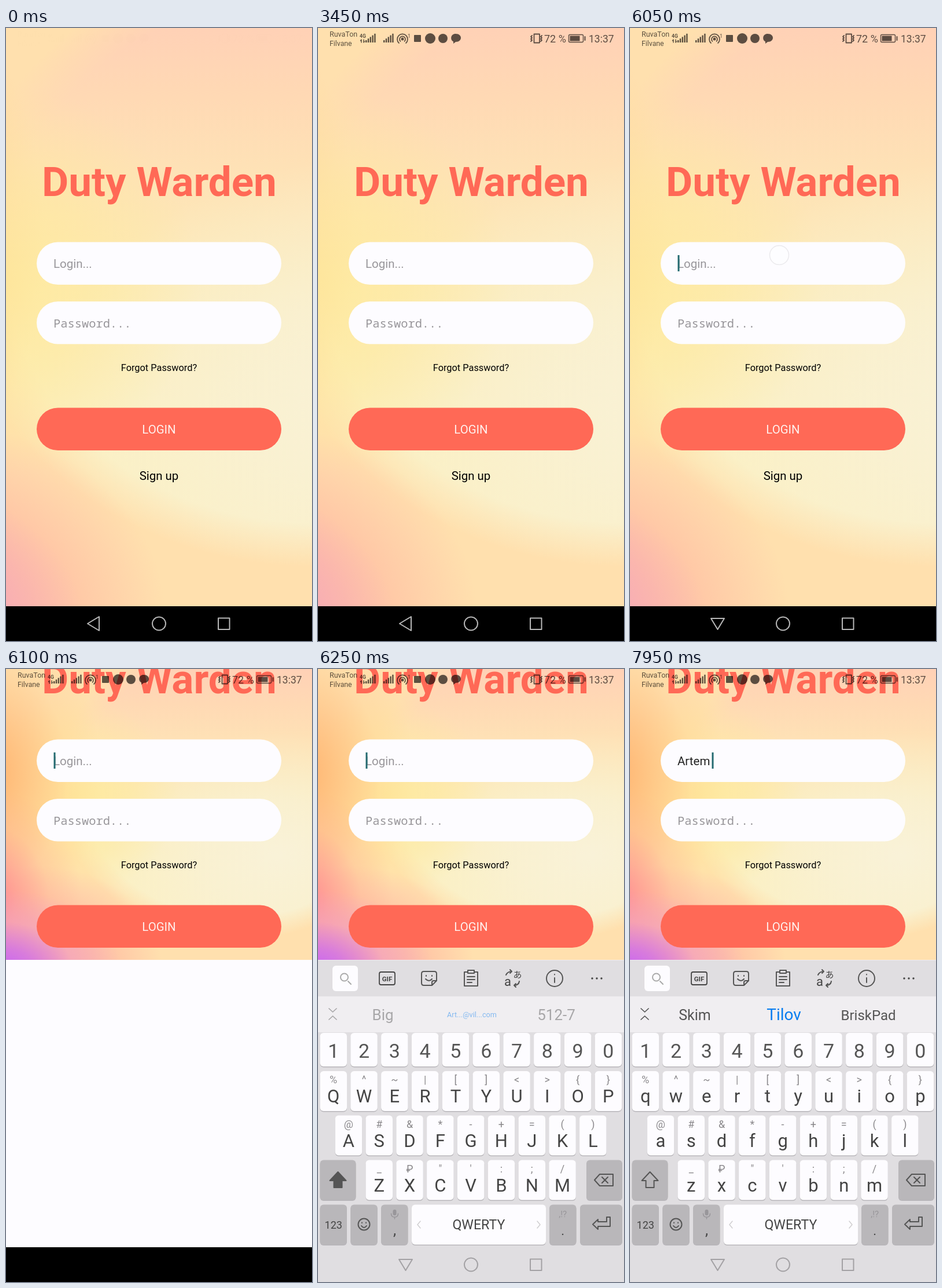
These frames come from a looping animation (529 by 1058 pixels, 8 s). An HTML page:

```html
<!DOCTYPE html>
<html lang="en">
<head>
<meta charset="utf-8">
<style>
html, body { margin: 0; width: 100%; height: 100%; overflow: hidden; background: #fdfcff; }
#clip { position: absolute; left: 0; top: 0; width: 529px; height: 998px; overflow: hidden; }
#sky {
  position: absolute; left: 0; top: 0; width: 529px; height: 502px;
  background:
    radial-gradient(ellipse 210px 140px at -10px 520px, #c662f4 0, #d274e6dd 28%, #eda0d077 60%, transparent),
    radial-gradient(ellipse 160px 190px at -30px 395px, #ff8690 0, #ff9590bb 30%, #ffa89044 65%, transparent),
    radial-gradient(ellipse 210px 170px at 60px 510px, #ffa8a0 0, #ffb4a0cc 45%, transparent),
    radial-gradient(ellipse 190px 270px at -25px 180px, #ffb470 0, #ffbc7c99 40%, #ffc88833 70%, transparent),
    radial-gradient(ellipse 180px 170px at 120px 220px, #ffe994bb 0, #ffe99877 50%, transparent),
    radial-gradient(ellipse 300px 255px at 400px 200px, transparent 90%, #ffe0ae 105%),
    radial-gradient(ellipse 300px 210px at 470px 320px, #f9f2d8 0, #f9f1d4cc 45%, transparent),
    linear-gradient(#ffd1b6, #ffd9b4 12%, #fee2b6 25%, #fcebb9 45%, #fbf0c2 70%, #fbf0c8);
}
svg { position: absolute; left: 0; top: 0; }
text { font-family: Roboto, sans-serif; }
.mid { text-anchor: middle; }
.line { fill: none; stroke: #555; stroke-width: 2; stroke-linejoin: round; stroke-linecap: round; }
</style>
</head>
<body>
<div id="clip"><div id="sky"></div></div>
<svg id="stage" width="529" height="1058" viewBox="0 0 529 1058"></svg>
<script>
const LOOP = 8000;
const $ = id => document.getElementById(id);
const clamp = v => Math.max(0, Math.min(1, v));
const text = (x, y, size, str, more = '') => `<text x="${x}" y="${y}" font-size="${size}" ${more}>${str}</text>`;
const mid = (x, y, size, str, fill, more = '') => text(x, y, size, str, `class="mid" fill="${fill}" ${more}`);
const box = (x, y, w, h, r, fill, more = '') =>
  `<rect x="${x}" y="${y}" width="${w}" height="${h}" rx="${r}" fill="${fill}" ${more}/>`;
const line = (d, more = '') => `<path class="line" d="${d}" ${more}/>`;

function form() {
  const pill = (y, fill) => box(53, y, 423, 73.5, 36.75, fill);
  return mid(265, 290, 71, 'Duty Warden', '#ff6956', 'font-weight="700"') +
    pill(369.5, '#fdfcff') + pill(472, '#fdfcff') +
    text(82, 414, 20.5, '', 'id="login"') +
    box(82.5, 392, 3, 28, 0, '#246a70', 'id="caret"') +
    text(82, 517, 20.4, 'Password...', 'fill="#98969a" style="font-family:Noto Sans Mono,monospace"') +
    mid(264.5, 592, 16.35, 'Forgot Password?', '#000') +
    pill(655.5, '#ff6956') +
    mid(264.5, 700, 20.4, 'LOGIN', '#fff1ee') +
    mid(264.5, 780, 20.4, 'Sign up', '#000');
}

function statusBar() {
  const bars = x => [0, 1, 2, 3, 4].map(i => box(x + i * 3.8, 21 - i * 2.8, 2.4, 4 + i * 2.8, 0, '#000')).join('');
  return text(20, 14.5, 12.5, 'RuvaTon') + text(20, 31, 12.3, 'Filvane') +
    text(72, 17, 8.5, '4G', 'font-weight="700"') +
    line('M75 25V20l-1.5 2M79 20v5l1.5-2', 'style="stroke:#000;stroke-width:1.4"') +
    bars(82) + bars(113) +
    '<circle cx="146" cy="19" r="2.5"/>' +
    line('M142.5 23a5 5 0 1 1 7 0M140 26a9 9 0 1 1 12 0', 'style="stroke:#000;stroke-width:1.7"') +
    text(155, 17, 9, '1') + box(166, 12, 12, 12, 1, '#000') +
    '<circle cx="194" cy="18" r="9"/><circle cx="216" cy="18" r="8"/>' +
    '<path d="M238 10c12 0 12 14 0 14l-4 3v-3.5c-6-3-5-13.5 4-13.5"/>' +
    line('M373.5 10.5h9.5v15h-9.5zM370 13l-2 2 2 2-2 2 2 2-2 2M387 13l-2 2 2 2-2 2 2 2-2 2', 'style="stroke:#000;stroke-width:1.8"') +
    text(391, 25, 18, '72 %') +
    box(433.5, 11.5, 25, 13, 2, 'none', 'stroke="#000" stroke-width="1.4"') +
    box(435.5, 13.5, 17, 9, 0, '#000') + box(460.5, 14, 2, 8, 1, '#000') +
    text(468, 25, 17.5, '13:37');
}

function toolbar() {
  return box(25, 512, 44, 44, 6, '#fdfcff') +
    line('M52 539l5 5M52 532a6.5 6.5 0 1 1-13 0 6.5 6.5 0 0 1 13 0', 'style="stroke:#aaa"') +
    box(106, 523, 27, 22, 3, 'none', 'stroke="#444" stroke-width="1.8"') +
    mid(119.5, 538.5, 11.5, 'GIF', '#444', 'font-weight="700"') +
    line('M183 522h18q4 0 4 4v12l-8 8h-14q-4 0-4-4v-16q0-4 4-4M205 538h-5q-3 0-3 3v5M186 535q6 6 11 0M187 529v1M197 529v1') +
    line('M259 523h-6v24h23v-24h-6M259 520h11v5h-11zM258 531h13M258 536h13M258 541h8') +
    mid(328, 547, 22, 'a', '#444') +
    mid(345, 533, 15, 'あ', '#444', 'style="font-family:Noto Sans CJK JP,Noto Sans CJK,sans-serif"') +
    line('M325 528q3-6 10-6l-3-3m3 3l-3 3M348 539q-1 7-9 7l3-3m-3 3l3 3') +
    '<circle class="line" cx="409" cy="534" r="14"/>' + line('M409 533v8M409 527v.5') +
    [474, 482, 490].map(x => `<circle cx="${x}" cy="534" r="1.7" fill="#444"/>`).join('');
}

function keyboard() {
  const escapes = { '<': '&lt;', '&': '&amp;' };
  const dark = '#b9b7ba';
  const key = (x, y, w, h, fill = '#fdfcff', more = '') =>
    box(x, y + 1.5, w, h, 6, '#b8b6ba') + box(x, y, w, h, 6, fill, more);
  const row = (x0, y, letters, hints) => [...letters].map((c, i) => {
    const x = x0 + i * 52.8;
    return key(x, y, 46.5, 69, '#fdfcff', `id="key${c}"`) +
      mid(x + 23.2, y + 21, 18, escapes[hints[i]] || hints[i], '#8a888b') +
      mid(x + 23.2, y + 54, 31, c, '#444', `data-key="${c}"`);
  }).join('');
  const digits = [...'1234567890'].map((c, i) =>
    key(3.5 + i * 52.8, 628, 46.5, 58) + mid(26.7 + i * 52.8, 671, 34, c, '#555')).join('');
  return box(0, 502.5, 529, 556, 0, '#e0dee1') + box(0, 565, 529, 62, 0, '#f0eef1') +
    toolbar() + '<g id="words">' +
    line('M19 586l6.5 6 6.5-6M19 605l6.5-6 6.5 6', 'style="stroke-width:1.7"') +
    [112, 266, 412].map((x, i) => mid(x, 606, 26, '', i === 1 ? '#087df0' : '#555', `id="word${i}"`)).join('') + '</g>' +
    digits +
    row(3.5, 694, 'QWERTYUIOP', '%^~|[]<>{}') +
    row(29.7, 770.5, 'ASDFGHJKL', '@#&*-+=()') +
    row(82.5, 847.5, 'ZXCVBNM', '_₽"\':;/') +
    key(3.5, 847.5, 62, 69, dark) + line('M34.5 868l14 15h-7v12h-14v-12h-7z', 'id="shift"') +
    key(464, 847.5, 62, 69, dark) + line('M478 882l9-10h23v20h-23zM491 877l10 10M501 877l-10 10') +
    key(3.5, 924.5, 46.5, 69, dark) + mid(26.7, 966, 18, '123', '#444') +
    key(56.3, 924.5, 46.5, 69, dark) + '<circle class="line" cx="79.5" cy="958.5" r="10"/>' +
    line('M75 961q4.5 6 9 0M76 955.5v.5M83 955.5v.5') +
    key(109, 924.5, 46.5, 69, dark) + mid(132.5, 977, 26, ',', '#444') +
    box(129.5, 933, 6, 10, 3, '#98969a') + line('M126.5 940q0 6 6 6t6-6M132.5 946v3', 'style="stroke:#98969a;stroke-width:1.5"') +
    key(162, 924.5, 232, 69) + mid(278, 967, 23.2, 'QWERTY', '#444') +
    line('M177 953l-5 6 5 6M379 953l5 6-5 6', 'style="stroke:#d0ced1;stroke-width:1.5"') +
    key(400, 924.5, 46.5, 69, dark) + mid(423.2, 946, 15, ',!?', '#98969a') + mid(423.2, 977, 22, '.', '#444') +
    key(453, 924.5, 73, 69, dark) + line('M484 950l-9 8.5 9 8.5v-5h21v-16h-6v8h-15z');
}

$('stage').innerHTML =
  `<svg id="page" width="529" height="998"><g id="form">${form()}</g></svg>` +
  `<g id="status" fill-opacity=".64" stroke-opacity=".64">${statusBar()}</g>` +
  box(0, 998, 529, 60, 0, '#000') + `<g id="keys">${keyboard()}</g>` +
  '<g id="nav" fill="none" stroke-width="2" stroke-linejoin="round"><path id="back"/>' +
  '<circle cx="264.5" cy="1028" r="11.5"/><rect x="367" y="1018.5" width="19.5" height="19.5"/></g>' +
  '<circle id="touch" r="16.5" fill="#fff" fill-opacity=".4" stroke="#000" stroke-opacity=".3" stroke-width="1.5"/>';

const letters = document.querySelectorAll('[data-key]');
// start, end, x, y
const taps = [[5800, 6100, 258, 392], [6950, 7300, 53, 805], [7700, 7950, 266, 597]];
// start, typed text, caret x, suggestions, their font sizes
const typing = [
  [0, '', 82.5, ['Big', 'Art...@vil...com', '512-7'], [26, 12.7, 26]],
  [7000, 'A', 96.5, ['A', 'Artem', 'And'], [26, 26, 26]],
  [7750, 'Artem', 141.5, ['Skim', 'Tilov', 'BriskPad'], [25, 28, 24]]
];

function set(id, attrs) {
  for (const name in attrs) $(id).setAttribute(name, attrs[name]);
}

function draw(t) {
  const small = t >= 6100;
  const shown = clamp((t - 6150) / 75);
  $('clip').style.height = (small ? 502.5 : 998) + 'px';
  $('sky').style.transform = small ? 'none' : 'translateY(248px) scale(1.988)';
  set('page', { height: small ? 502.5 : 998 });
  set('form', { transform: `translate(0 ${small ? -248 : 0})` });
  set('status', { opacity: clamp(t / 150) });

  const [, typed, caretX, words, sizes] = typing.findLast(s => t >= s[0]);
  $('login').textContent = typed || 'Login...';
  set('login', { fill: typed ? '#222' : '#98969a' });
  set('caret', { x: caretX, opacity: t >= 6000 ? 1 : 0 });
  words.forEach((word, i) => {
    $('word' + i).textContent = word;
    set('word' + i, { 'font-size': sizes[i], y: sizes[i] < 20 ? 601 : 605.5 });
  });

  set('keys', { opacity: shown, transform: `translate(0 ${30 * (1 - shown) ** 2})` });
  set('words', { opacity: clamp((t - 6140) / 240) });
  letters.forEach(e => e.textContent = typed ? e.dataset.key.toLowerCase() : e.dataset.key);
  $('shift').style.fill = typed ? 'none' : '#555';
  set('keyA', { fill: t >= 6950 && t < 7050 ? '#d0ced1' : '#fdfcff' });

  set('nav', { stroke: shown ? '#a3a1a4' : '#b8b8b8', opacity: small ? shown : 1 });
  set('back', { d: t >= 6050 ? 'M140 1019h23l-11.5 19z' : 'M141 1028l20-12v24z' });

  const [start, end, cx, cy] = taps.findLast(p => t >= p[0]) || taps[0];
  set('touch', { cx, cy, opacity: t >= start && t < end ? 1 - (t - start) / 330 : 0 });
}

function tick() {
  draw(performance.now() % LOOP);
  requestAnimationFrame(tick);
}
tick();
</script>
</body>
</html>
```
